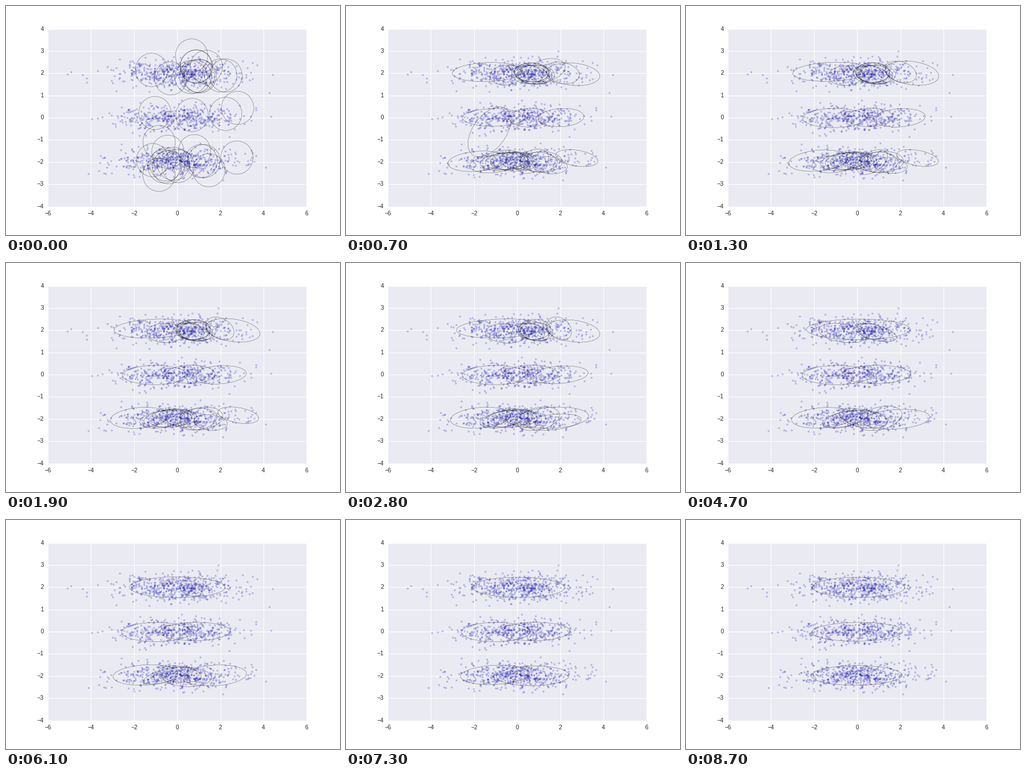
Animation of 576x396 px, one loop 8800 ms. Source, as a matplotlib script:

```python
import numpy as np
import matplotlib.pyplot as plt
from matplotlib.animation import FuncAnimation
from matplotlib.patches import Ellipse

FRAMES, STEP = 88, 100
DPI = 72
INK = "#262626"
ROWS = np.array([2, 0, -2])
SIGMAS = 1.5        # ellipse size in standard deviations
MERGED = 83         # from here on, one component per row

rng = np.random.default_rng(11)


def make_cloud():
    """Three wide normal rows plus a few far strays."""
    parts = [[(-5.08, 1.95), (-4.92, 2.06), (-4.38, 1.93), (-4.2, 1.77),
              (-4.2, 1.58), (4.42, 1.93), (4.27, 1.11), (1.9, 3.0),
              (-3.97, -0.04), (4.35, 0.05), (-4.12, -2.53), (4.1, -2.25)]]
    for y, count in zip(ROWS, (580, 500, 590)):
        row = rng.normal((0, y), (1.4, 0.3), (count, 2))
        parts.append(row[(abs(row[:, 0]) < 3.7) & (abs(row[:, 1] - y) < 0.85)])
    return np.vstack(parts)


def start_means():
    """Separate starting circles, then two crowded groups."""
    lone = [(0.67, 2.8), (-1.19, 2.15), (0.88, 2.3), (0.89, 2.31), (1.35, 2.29),
            (-0.3, 1.77), (2.02, 1.9), (2.26, 1.9), (-1.03, 0.21), (0.69, 0.12),
            (2.25, 0.17), (2.8, 0.44), (-0.84, -1.1), (-0.43, -1.54),
            (0.8, -1.51), (2.77, -1.8), (1.47, -2.37), (1.11, -1.96), (1.24, -1.96)]
    upper = rng.normal((0.65, 1.84), (0.3, 0.07), (4, 2))
    lower = rng.normal((-0.5, -2.13), (0.35, 0.15), (7, 2))
    return np.vstack([lone, upper, lower])


def density(pts, mean, cov):
    d = pts - mean
    dist = np.einsum("ni,ij,nj->n", d, np.linalg.inv(cov), d)
    return np.exp(-dist / 2) / np.sqrt(np.linalg.det(cov))


def em_step(pts, weights, means, covs):
    """One expectation-maximisation step for a Gaussian mixture."""
    resp = np.array([w * density(pts, m, c) for w, m, c in zip(weights, means, covs)])
    resp /= resp.sum(axis=0) + 1e-12
    mass = resp.sum(axis=1) + 1e-9
    means = resp @ pts / mass[:, None]
    d = pts - means[:, None]
    covs = np.einsum("kn,kni,knj->kij", resp, d, d) / mass[:, None, None]
    weights = mass ** 1.03      # slightly favours the heavy components
    return weights / weights.sum(), means, covs + 0.002 * np.eye(2)


def prune(weights, means, covs, count):
    """Drop the lightest components, but never the last one of a row."""
    while len(weights) > count:
        row = abs(means[:, 1:] - ROWS).argmin(axis=1)
        shared = np.bincount(row, minlength=3)[row] > 1
        k = np.where(shared, weights, np.inf).argmin()
        weights, means, covs = (np.delete(a, k, axis=0) for a in (weights, means, covs))
    return weights / weights.sum(), means, covs


def run_fit(pts):
    means = start_means()
    total = len(means)
    weights = np.full(total, 1 / total)
    covs = np.tile(0.25 * np.eye(2), (total, 1, 1))
    states = [(means, covs)]
    for frame in range(1, FRAMES):
        left = max(0, 1 - frame / MERGED) ** 1.25
        count = 3 + int(np.ceil((total - 3) * left))
        weights, means, covs = em_step(pts, *prune(weights, means, covs, count))
        states.append((means, covs))
    return states


cloud = make_cloud()
states = run_fit(cloud)

plt.rcParams["font.family"] = "Liberation Sans"
fig = plt.figure(figsize=(576 / DPI, 396 / DPI), dpi=DPI, facecolor="white")
ax = fig.add_axes([0.125, 0.125, 0.775, 0.775], facecolor="#EAEAF2")
ax.set(xlim=(-6, 6), ylim=(-4, 4), xticks=range(-6, 7, 2), yticks=range(-4, 5))
ax.grid(color="white", linewidth=1)
ax.set_axisbelow(True)
ax.tick_params(length=0, pad=7, labelsize=10, labelcolor=INK)
for label in ax.get_yticklabels():
    label.set_va("center")
for spine in ax.spines.values():
    spine.set_visible(False)

ax.scatter(*cloud.T, s=9, c="#0000ff", alpha=0.2, edgecolors="black", linewidths=0.3)
rings = [ax.add_patch(Ellipse((0, 0), 1, 1, fill=False, edgecolor="black",
                              linewidth=0.3, zorder=3))
         for _ in states[0][0]]


def update(frame):
    for ring in rings:
        ring.set_visible(False)
    for ring, mean, cov in zip(rings, *states[frame]):
        (minor, major), axes = np.linalg.eigh(cov)
        angle = np.degrees(np.arctan2(axes[1, 1], axes[0, 1]))
        ring.set(center=mean, width=2 * SIGMAS * np.sqrt(major),
                 height=2 * SIGMAS * np.sqrt(minor), angle=angle, visible=True)
    return rings


anim = FuncAnimation(fig, update, frames=FRAMES, interval=STEP,
                     init_func=lambda: update(0), repeat=True, repeat_delay=0)
plt.show()
```
